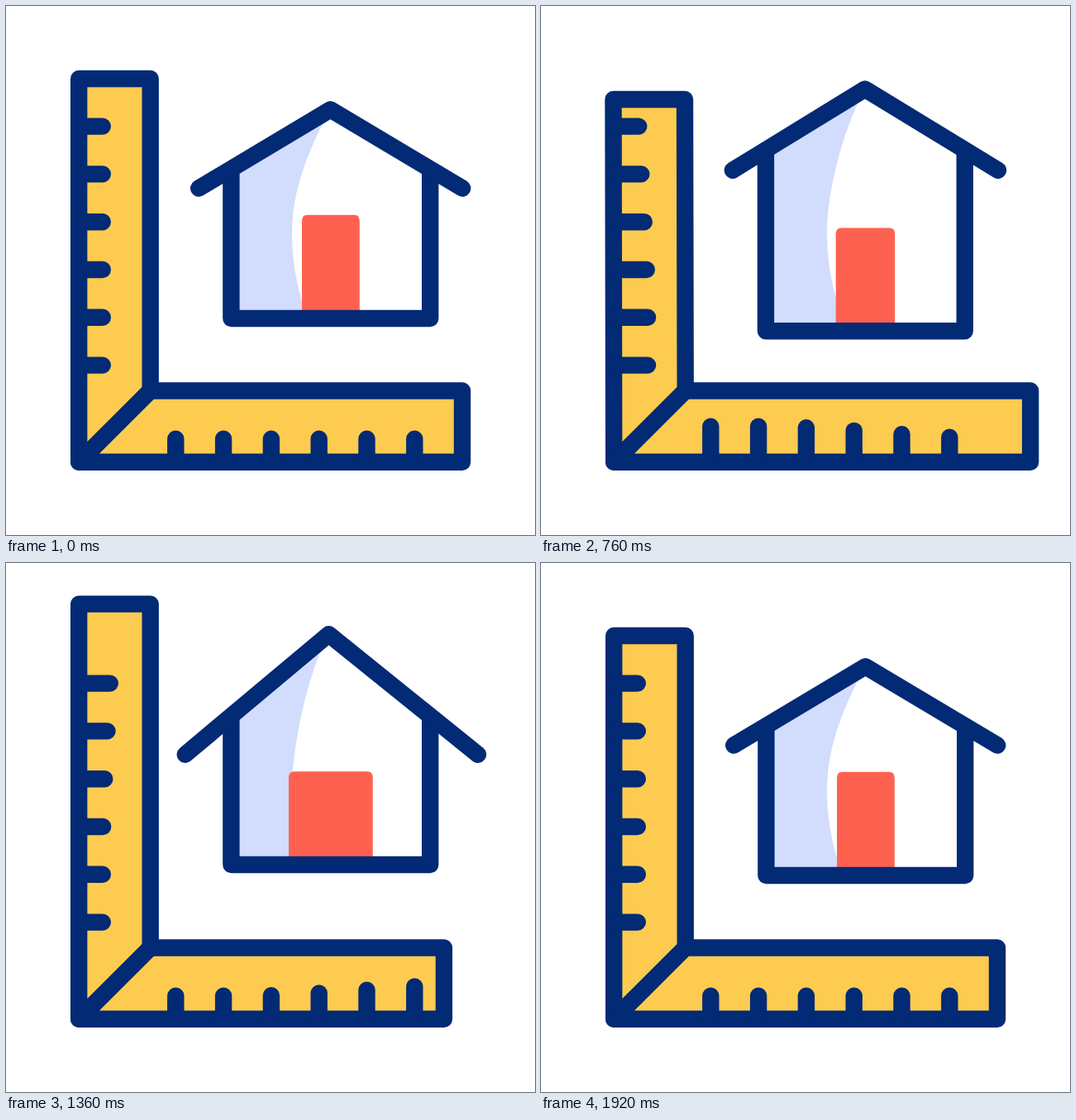
Animation, 640 px wide and 640 px high, one loop 2 s. Source, as an HTML page:

```html
<!DOCTYPE html>
<html lang="en">
<head>
<meta charset="utf-8">
<title>House plan</title>
<style>
  html, body { margin: 0; width: 100%; height: 100%; overflow: hidden; background: #fff; }
  svg { display: block; width: 100vw; height: 100vh; }
  .line { fill: none; stroke: #032a75; stroke-width: 20.4; stroke-linecap: round; stroke-linejoin: round; }
  .ruler { fill: #fdcb50; }
  .walls { stroke-linecap: butt; }
</style>
</head>
<body>
<svg viewBox="0 0 640 640">
  <path id="shade" fill="#d2dcfd"/>
  <path id="door" fill="#ff6150"/>
  <path id="walls" class="line walls"/>
  <path id="roof" class="line"/>
  <path id="upright" class="line ruler"/>
  <path id="level" class="line ruler"/>
  <path id="ticks" class="line"/>
</svg>
<script>
const LOOP = 2000, STEP = 40;

// Key times: leave rest, arrive low, leave low, arrive high, leave high, back at rest.
const RULER_TIMES = [80, 640, 640, 1200, 1200, 1840];
const HOUSE_TIMES = [80, 640, 680, 1260, 1300, 1920];

// Values at rest, low and high.
const RULER = { top: [88, 122.5, 42.5], right: [552, 601, 525.8], lean: [0, -0.8, 0] };
const HOUSE = {
  apexX: [392.5, 392, 390.4], apexY: [125.3, 101.3, 85.2],
  eaveL: [233.2, 232.7, 216.3], eaveR: [552.2, 552, 571.5], eaveY: [220.5, 196.9, 232],
  base: [378, 394.8, 364.6], shift: [0, -0.5, 0],
  doorTop: [252.8, 269.3, 252.2], doorHalf: [34.9, 34.9, 51.3]
};

const LEFT = 88.2, INNER_X = 174.7, INNER_Y = 465.5, BOTTOM = 551.8;
const TICKS = 6, TICK_GAP = 57.8, TICK_DELAY = 80;

const el = id => document.getElementById(id);
const draw = (id, d) => el(id).setAttribute('d', d);

function ease(t, from, to) {
  const p = Math.min(1, Math.max(0, (t - from) / (to - from)));
  return p * p * (3 - 2 * p);
}

function pose(t, times, values) {
  const [a, b, c, d, e, f] = times;
  const toLow = ease(t, a, b), toHigh = ease(t, c, d), toRest = ease(t, e, f);
  const out = {};
  for (const [key, [rest, low, high]] of Object.entries(values)) {
    out[key] = rest + (low - rest) * toLow + (high - low) * toHigh + (rest - high) * toRest;
  }
  return out;
}

function drawRuler(t) {
  const { top, right, lean } = pose(t, RULER_TIMES, RULER);
  draw('upright', `M${LEFT + lean} ${top}H${INNER_X + lean}L${INNER_X} ${INNER_Y}L${LEFT} ${BOTTOM}Z`);
  draw('level', `M${LEFT} ${BOTTOM}L${INNER_X} ${INNER_Y}H${right}V${BOTTOM}Z`);

  let d = '';
  for (let i = 0; i < TICKS; i++) {
    const local = t - i * TICK_DELAY;
    const grow = ease(local, 270, 685) - ease(local, 815, 1245);
    d += `M${LEFT} ${434.6 - i * TICK_GAP}H${116.8 + 12.3 * grow}`;
    d += `M${205.3 + i * TICK_GAP} ${BOTTOM}V${523.6 - 15 * grow}`;
  }
  draw('ticks', d);
}

function drawHouse(t) {
  const h = pose(t, HOUSE_TIMES, HOUSE);
  const left = 272.4 + h.shift, right = 513.2 + h.shift;
  const roofY = (x, eave) => h.apexY + (h.eaveY - h.apexY) * (x - h.apexX) / (eave - h.apexX);
  const wallL = roofY(left, h.eaveL), wallR = roofY(right, h.eaveR);

  draw('roof', `M${h.eaveL} ${h.eaveY}L${h.apexX} ${h.apexY}L${h.eaveR} ${h.eaveY}`);
  draw('walls', `M${left} ${wallL}V${h.base}H${right}V${wallR}`);
  draw('shade', `M${left} ${wallL}L${h.apexX} ${h.apexY}` +
    `C${h.apexX - 25} ${h.apexY + 45} 346 222 346 274` +
    `C346 305 350.5 333 360.5 366L364 ${h.base}H${left}Z`);

  const mid = 392.9 + h.shift, x1 = mid - h.doorHalf, x2 = mid + h.doorHalf;
  draw('door', `M${x1} ${h.base}V${h.doorTop + 7}q0-7 7-7H${x2 - 7}q7 0 7 7V${h.base}Z`);
}

function render(now) {
  const t = Math.floor((now % LOOP) / STEP) * STEP;
  drawRuler(t);
  drawHouse(t);
}

const start = performance.now();
function tick() {
  render(performance.now() - start);
  requestAnimationFrame(tick);
}
tick();
</script>
</body>
</html>
```
